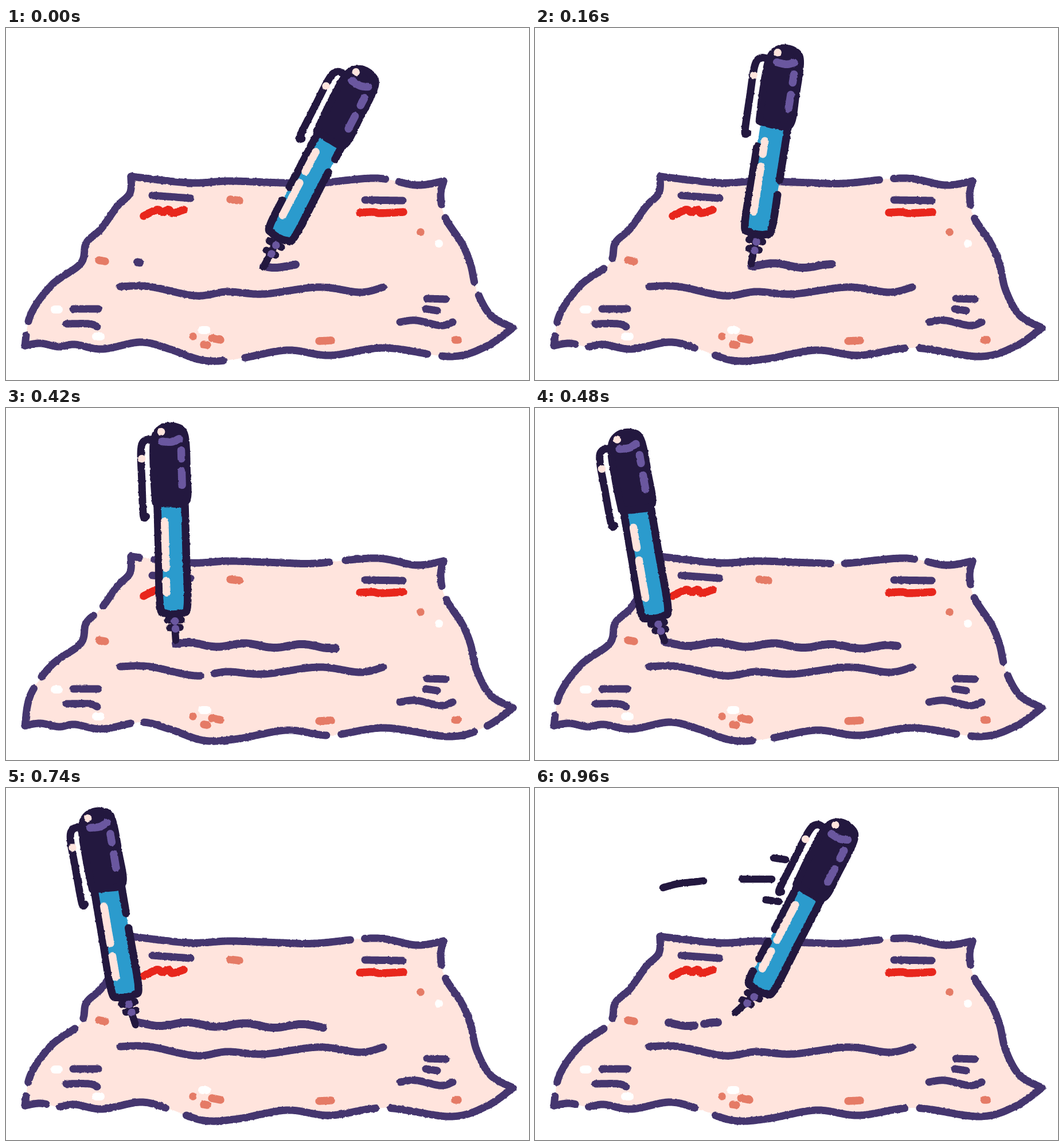
These frames come from a looping animation (912 by 614 pixels, 1.12 s). An HTML page:

```html
<!DOCTYPE html>
<html lang="en">
<head>
<meta charset="utf-8">
<title>Signing a paper</title>
<style>
  html, body { margin: 0; width: 100%; height: 100%; overflow: hidden; background: #fff; }
  svg { display: block; width: 912px; height: 614px; fill: none; stroke-linecap: round; stroke-linejoin: round; }
</style>
</head>
<body>
<svg viewBox="0 0 912 614">
  <filter id="rough" filterUnits="userSpaceOnUse" x="0" y="0" width="912" height="614" color-interpolation-filters="sRGB">
    <feTurbulence id="grain" type="fractalNoise" baseFrequency=".2" result="noise"/>
    <feDisplacementMap in="SourceGraphic" in2="noise" scale="3" xChannelSelector="R" yChannelSelector="G"/>
  </filter>
  <g id="scene" filter="url(#rough)"></g>
</svg>
<script>
const FRAME_MS = 160, GAP_RADIUS = 11.5;
const INK = '#45366f', DARK = '#23183f', VIOLET = '#6a579f', BLUE = '#2b9bcd',
      PAPER = '#ffe4dd', CORAL = '#e57b66', RED = '#e8261c', WHITE = '#fff';

// Strokes are "x,y x,y ..." key points, separated by "/".
const sides = [
  '218,259 216,288 194,311 166,350 140,375 130,411 80,448 43,500 33,554',
  '33,554 60,550 92,556 120,552 168,560 235,548 285,560 345,580 405,577 490,562 565,571 660,558 775,573 838,555 884,523',
  '884,523 845,501 821,458 810,412 795,376 766,331 758,293 763,267',
  '763,267 715,274 645,262 540,271 480,270 390,267 320,270 218,259'
];
const textLines = '255,292 322,297/626,300 692,301/199,451 250,451 330,467 385,460 450,464 545,452 617,461 658,452'
  + '/117,490 161,490/105,516 145,516 159,521/734,472 767,473/732,490 752,493/687,513 715,510 758,519 779,513';
const redLines = '240,328 263,317 272,321 284,317 290,323 310,317/617,322 640,321 653,323 693,321';
const specks = '391,299 407,301/162,405 173,407/723,356/326,538/345,552 351,553/359,541 374,544/546,546 567,545/783,544 788,544';
const glints = '85,491 92,491/342,527 350,527/157,538 165,538/755,376';

// Three redrawn papers differ in where the pencil lifts off.
const paperGaps = [
  '39,524 392,579 405,577 749,570 818,455 762,320 673,265 528,270',
  '128,411 36,525 82,553 290,562 303,567 658,559 765,320 612,264',
  '163,356 57,480 229,549 572,570 828,560 764,322 578,268 245,262 351,465'
];

// base: foot of the barrel; nib: where it touches; written: x ranges of the signature.
const poses = [
  { base: [475, 367], nib: [449, 417], lean: 27.5, shineGap: 114, gaps: '486,289 565,239', written: [[229, 233], [449, 505]] },
  { base: [387, 361], nib: [377, 411], lean: 9, shineGap: 130, gaps: '392,175 388,193 424,277', written: [[377, 518]] },
  { base: [293, 361], nib: [296, 405], lean: -1.5, shineGap: 71, written: [[296, 575]] },
  { base: [211, 368], nib: [226, 406], lean: -9.7, shineGap: 117, written: [[226, 632]] },
  { base: [210, 366], nib: [226, 413], lean: -9.6, shineGap: 87, gaps: '214,231', written: [[225, 553]] },
  { base: [213, 367], nib: [230, 414], lean: -10.5, shineGap: 70, gaps: '176,295', written: [[231, 478]] },
  { base: [389, 355], nib: [349, 392], lean: 27.4, shineGap: 84, gaps: '413,258 384,308', written: [[233, 278], [295, 319]],
    speed: '223,174 250,167 294,162/361,159 413,159/416,122 437,125/402,195 425,198' }
];

const parse = text => text.split(' ').filter(Boolean).map(p => p.split(',').map(Number));

// Samples a Catmull-Rom curve through the key points.
function smooth(points) {
  const at = i => points[Math.max(0, Math.min(points.length - 1, i))];
  const result = [points[0]];
  for (let i = 0; i < points.length - 1; i++) {
    const [a, b, c, d] = [at(i - 1), at(i), at(i + 1), at(i + 2)];
    for (let n = 1; n <= 40; n++) {
      const t = n / 40;
      result.push([0, 1].map(k => b[k] + t / 2 * (c[k] - a[k]
        + t * (2 * a[k] - 5 * b[k] + 4 * c[k] - d[k] + t * (3 * (b[k] - c[k]) + d[k] - a[k])))));
    }
  }
  return result;
}

const pathData = points => 'M' + points.map(p => p.map(v => v.toFixed(1))).join('L');

// Draws a curve, lifting the pencil near every gap centre.
function stroke(points, color, width, gaps = []) {
  const runs = [[]];
  for (const [x, y] of smooth(points)) {
    const lifted = gaps.some(g => Math.hypot(x - g[0], y - g[1]) < GAP_RADIUS);
    if (!lifted) runs.at(-1).push([x, y]);
    else if (runs.at(-1).length) runs.push([]);
  }
  const d = runs.filter(run => run.length).map(run => pathData(run) + 'h0').join('');
  return `<path d="${d}" stroke="${color}" stroke-width="${width}"/>`;
}

const strokes = (text, color, width, gaps, place = p => p) =>
  text.split('/').map(s => stroke(parse(s).map(place), color, width, gaps)).join('');

const fill = (points, color, extra = '') => `<path d="${pathData(points)}Z" fill="${color}" ${extra}/>`;

function drawPaper(gaps) {
  return fill(sides.flatMap(side => smooth(parse(side))), PAPER)
    + strokes(specks, CORAL, 13.5) + strokes(glints, WHITE, 14) + strokes(redLines, RED, 13.5)
    + strokes(textLines, INK, 13, gaps) + strokes(sides.join('/'), INK, 13, gaps);
}

// The signature is a gentle wave across the sheet.
function drawWriting([from, to]) {
  const count = Math.ceil((to - from) / 20);
  const points = Array.from({ length: count + 1 }, (_, i) => {
    const x = from + (to - from) * i / count;
    return [x, 411 + 0.015 * (x - 225) - 3.5 * Math.cos((x - 317) * Math.PI / 50)];
  });
  return stroke(points, INK, 14);
}

function drawPen({ base, nib, lean, shineGap, gaps = '' }) {
  const angle = lean * Math.PI / 180, cos = Math.cos(angle), sin = Math.sin(angle);
  const place = ([x, y]) => [base[0] + x * cos - y * sin, base[1] + x * sin + y * cos];
  const part = (text, color, width = 13) => strokes(text, color, width, [], place);
  const barrel = parse('-24,-200 -24,-110 -24,-18 -14,-3 14,-3 24,-18 24,-110 24,-200').map(place);
  const cap = parse('-27,-197 -29,-250 -27,-306 -12,-327 12,-328 27,-312 29,-250 27,-199 0,-194 -27,-197').map(place);

  // Two collars cross the nib.
  const collars = [[0.2, 12], [0.5, 9]].map(([t, half]) => {
    const [x, y] = base.map((v, k) => v + (nib[k] - v) * t);
    return {
      bar: stroke([[x - half * cos, y - half * sin], [x + half * cos, y + half * sin]], DARK, 12.5),
      dot: stroke([[x + 1, y + 2]], VIOLET, 13.5)
    };
  });

  return fill(barrel, BLUE) + stroke(barrel, DARK, 13.5, parse(gaps))
    + fill(smooth(cap), DARK, `stroke="${DARK}" stroke-width="13"`)
    + part('-26,-306 -42,-306 -50,-290 -50,-235 -49,-176 -44,-173', DARK)
    + stroke([base, nib], DARK, 12.5)
    + collars.map(c => c.bar).join('') + collars.map(c => c.dot).join('')
    + part('-13,-303 4,-302 17,-307/20,-287 20,-272/20,-251 20,-226', VIOLET, 13.5)
    + part(`-12,-164 -12,${-shineGap - 11}/-12,${11 - shineGap} -12,-39/-14,-320/-49,-274`, PAPER, 13.5);
}

const pictures = poses.map((pose, i) =>
  drawPaper(parse(paperGaps[i % 3]))
  + pose.written.map(drawWriting).join('')
  + drawPen(pose)
  + (pose.speed ? strokes(pose.speed, DARK, 12.5) : ''));
// The last pose repeats the second paper.
pictures[6] = pictures[6].replace(drawPaper(parse(paperGaps[0])), drawPaper(parse(paperGaps[1])));

const scene = document.getElementById('scene');
const grain = document.getElementById('grain');
let shown = -1;

function tick() {
  const index = Math.floor(performance.now() / FRAME_MS) % pictures.length;
  if (index !== shown) {
    shown = index;
    grain.setAttribute('seed', 1 + index % 3);
    scene.innerHTML = pictures[index];
  }
  requestAnimationFrame(tick);
}
tick();
</script>
</body>
</html>
```
